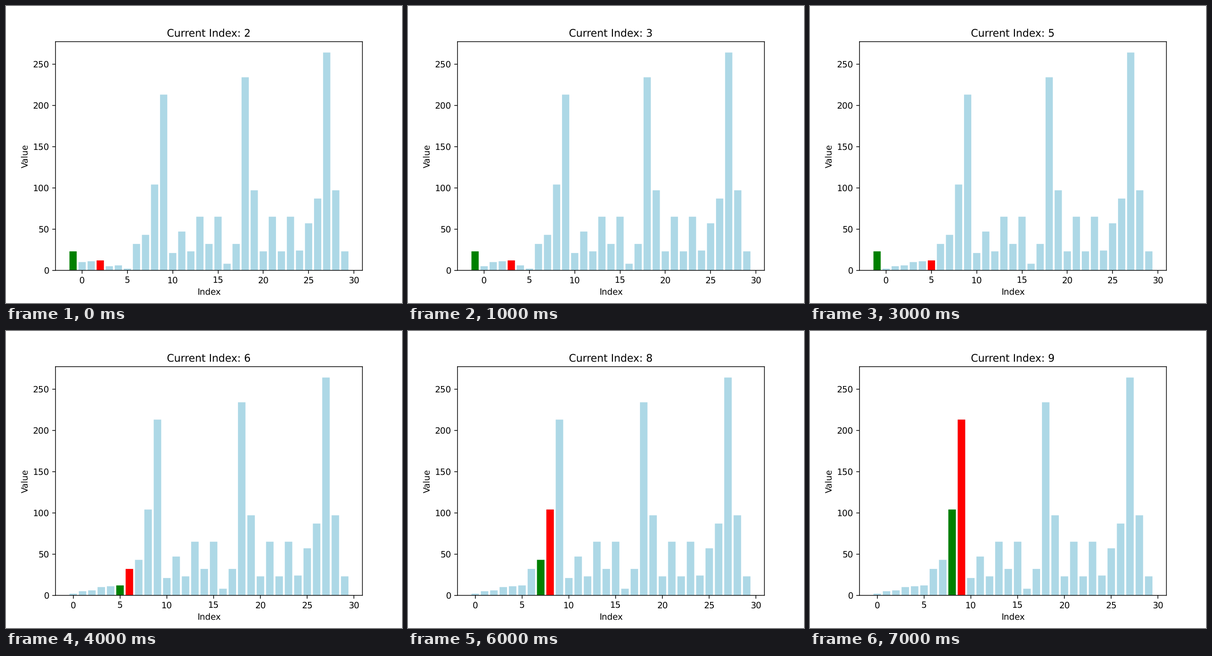
Animation of 864x648 px, one loop 8 s. Source, as a matplotlib script:

```python
import matplotlib.pyplot as plt
from matplotlib.animation import FuncAnimation

# Soft, unsnapped edges and glyphs
plt.rcParams.update({"path.snap": False, "text.hinting": "none"})

FIRST, STEPS = 2, 8


def rise(start, slope, bend, count):
    """Values along a parabola, rounded to whole numbers."""
    return [round(start + slope * n + bend * n * n) for n in range(count)]


def unsorted_values():
    pair = [23, 65]
    low = [11, 12, 10, 5, 6, 2]
    first = rise(32, -13.3, 24.55, 4)
    middle = [21, 47, *pair, 32, 65, 8, 32, 234, 97]
    last = rise(24, 34.5, -1.5, 3) + [264, 97, 23]
    return low + first + middle + pair * 2 + last


def insert(values, i):
    """Insert values[i] into the sorted part; return where the scan stopped."""
    key, j = values[i], i - 1
    while j >= 0 and values[j] > key:
        values[j + 1] = values[j]
        j -= 1
    values[j + 1] = key
    return j


def draw(step):
    values = unsorted_values()
    current = FIRST + step
    for i in range(1, current + 1):
        j = insert(values, i)

    ax.clear()
    ax.bar(range(len(values)), values, color="lightblue")
    ax.bar(current, values[current], color="red")
    # j may be -1: the bar then sits left of zero with the last value
    ax.bar(j, values[j], color="green")
    ax.set_title(f"Current Index: {current}")
    ax.set_xlabel("Index")
    ax.set_ylabel("Value")
    return ax.patches


fig, ax = plt.subplots(figsize=(6.4, 4.8), dpi=135)
anim = FuncAnimation(fig, draw, frames=STEPS, interval=1000, repeat=True)
plt.show()
```
